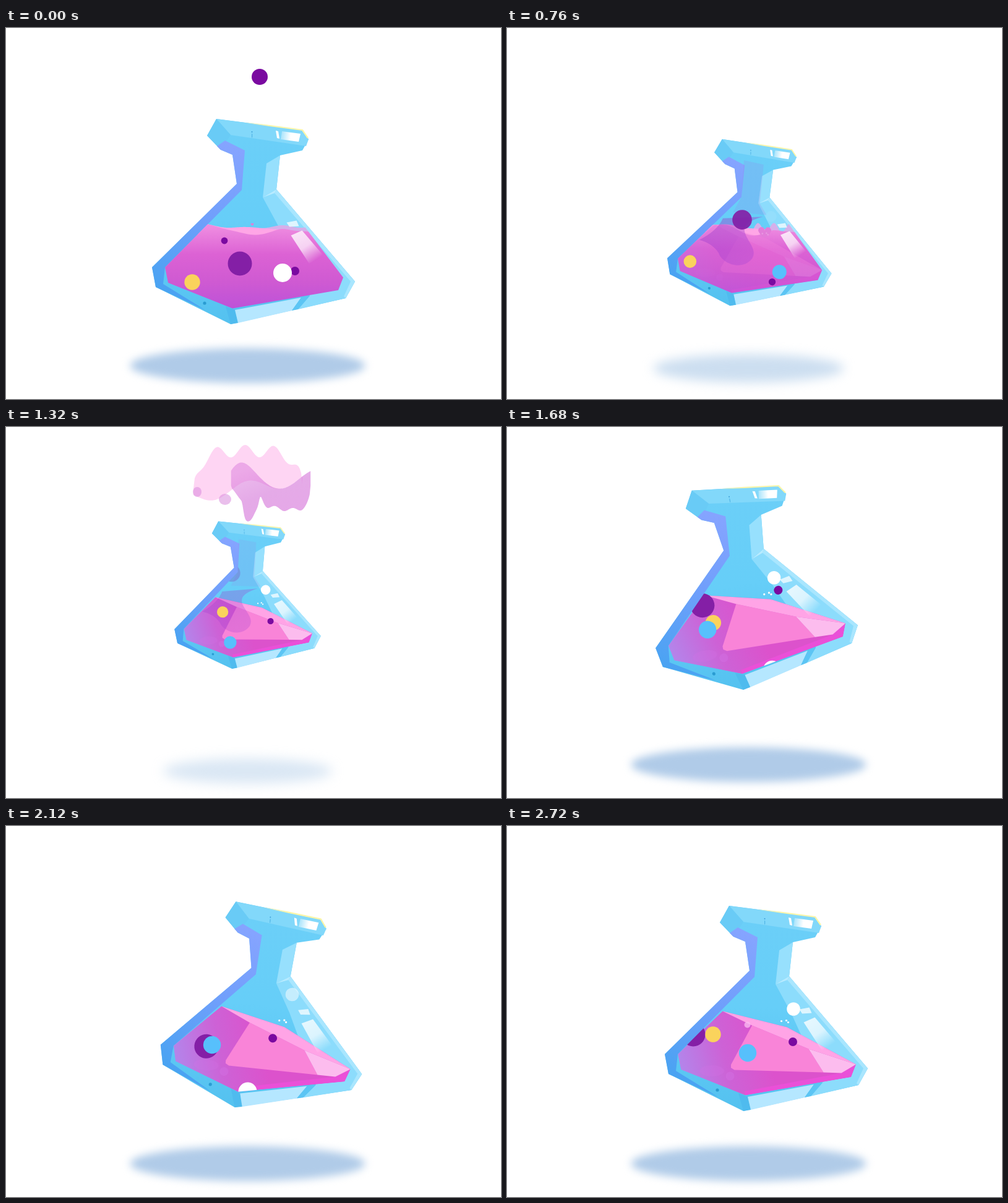
Recreate the animation shown at these times as an HTML page with a canvas. Size 800 by 600 pixels, loop 2760 ms.

```html
<!DOCTYPE html>
<html lang="en">
<head>
<meta charset="utf-8">
<title>Potion flask</title>
<style>
  html, body { margin: 0; width: 100%; height: 100%; overflow: hidden; background: #fff; }
  canvas { display: block; width: 800px; height: 600px; }
</style>
</head>
<body>
<canvas id="stage" width="800" height="600"></canvas>
<script>
const ctx = document.getElementById('stage').getContext('2d');
const LOOP = 2760, STEP = 40;

const clamp = v => Math.max(0, Math.min(1, v));
const ramp = (t, a, b) => { const k = clamp((t - a) / (b - a)); return k * k * (3 - 2 * k); };
const bump = (x, center, width) => Math.exp(-(((x - center) / width) ** 2));

// Monotone cubic motion through key poses [time, ...values].
function along(t, keys) {
  const last = keys.length - 1;
  t = Math.max(keys[0][0], Math.min(keys[last][0], t));
  let i = 0;
  while (i < last - 1 && t >= keys[i + 1][0]) i++;
  const h = keys[i + 1][0] - keys[i][0], u = (t - keys[i][0]) / h, w = 1 - u;
  return keys[0].slice(1).map((_, c) => {
    const value = j => keys[j][c + 1];
    const slope = j => (value(j + 1) - value(j)) / (keys[j + 1][0] - keys[j][0]);
    const tangent = j => {
      if (j === 0 || j === last) return 0;
      const a = slope(j - 1), b = slope(j);
      return a * b > 0 ? 2 * a * b / (a + b) : 0;
    };
    return value(i) * (1 + 2 * u) * w * w + tangent(i) * h * u * w * w
      + value(i + 1) * u * u * (3 - 2 * u) - tangent(i + 1) * h * u * u * w;
  });
}

function gradient(x0, y0, x1, y1, ...colors) {
  const g = ctx.createLinearGradient(x0, y0, x1, y1);
  colors.forEach((c, i) => g.addColorStop(i / (colors.length - 1), c));
  return g;
}

function trace(...points) {
  const p = points.flat();
  ctx.beginPath();
  for (let i = 0; i < p.length; i += 2) ctx.lineTo(p[i], p[i + 1]);
  ctx.closePath();
}

function poly(fill, ...points) {
  trace(...points);
  ctx.fillStyle = fill;
  ctx.fill();
}

// Area between two curves.
function band(fill, x0, x1, top, bottom) {
  const n = 90, xs = Array.from({ length: n + 1 }, (_, i) => x0 + (x1 - x0) * i / n);
  poly(fill, xs.map(x => [x, top(x)]).flat(), xs.reverse().map(x => [x, bottom(x)]).flat());
}

function dot(fill, x, y, r, ry = r) {
  ctx.beginPath();
  ctx.ellipse(x, y, r, ry, 0, 0, 7);
  ctx.fillStyle = fill;
  ctx.fill();
}

function layer(alpha, draw) {
  if (alpha <= 0) return;
  ctx.save();
  ctx.globalAlpha *= alpha;
  draw();
  ctx.restore();
}

// Corners shared by the facets of the glass and the crystal.
const lipBack = [340, 147], lipFront = [363, 173], lipLow = [347, 197], lipLeft = [325, 174];
const lipTail = [480, 165], lipRight = [489, 180], neckLeft = [366, 205], neckRight = [443, 206];
const waistLeft = [373, 252], waistRight = [437, 261], waistMid = [415, 274];
const left = [236, 387], leftLow = [242, 419], right = [564, 410], rightLow = [549, 437], bottom = [363, 479];
const inLeft = [257, 387], inLeftLow = [262, 412], inBottom = [366, 453.5];
const inRight = [545, 403.5], inRightLow = [537, 424], inWaist = [381, 262];
const peak = [329.5, 317.5], ridge = [433.5, 343.5], fold = [377, 340.5], elbow = [468.5, 378.5];
const heel = [492.5, 416.5], keel = [521.5, 417.5];

const FLASK_PATH = [
  [0, 400, 398.5, 0], [480, 400, 398.5, -4.8], [1040, 383.5, 359.5, 7.4], [1320, 390.5, 332.5, -1.3],
  [1680, 403.5, 339, -10.5], [2120, 412.5, 377.5, 4.3], [2720, 419, 380.5, 0],
];

const BUBBLES = [
  { color: '#7a0aa0', r: 7, path: [[0, 467, 393], [480, 444, 441], [1320, 452, 374], [1680, 448, 331], [2120, 416, 363], [2720, 443, 367]] },
  { color: '#841fa6', r: 19.5, path: [[0, 378, 381], [480, 386, 337], [1320, 367, 264], [1680, 323, 333], [2120, 310, 384], [2720, 282, 355]],
    alpha: t => 1 - 0.75 * (ramp(t, 700, 1000) - ramp(t, 1350, 1600)) },
  { color: '#fad35c', r: 12.7, path: [[0, 301, 411], [480, 275, 385], [1040, 297, 400], [1320, 345, 351], [2120, 319, 381], [2720, 314, 355]] },
  { color: '#57c0fc', r: 14.2, path: [[0, 447, 396], [480, 490, 397], [1180, 380, 431], [1680, 324, 373], [2120, 319, 381], [2720, 370, 385]] },
  { color: '#fff', r: 15, path: [[0, 447, 396], [480, 387, 439], [1040, 400, 482], [1680, 415, 456], [2120, 382, 452], [2720, 360, 482]] },
  { color: '#fff', r: 10.8, path: [[1040, 441, 299], [1680, 445, 310], [2120, 442, 290], [2720, 444, 314]],
    alpha: t => ramp(t, 700, 1080) * (1 - 0.5 * bump(t, 2120, 200)) },
];

function drawGlass() {
  poly(gradient(400, 150, 400, 470, '#6ccff8', '#66cef8', '#55c2f0'), lipBack, lipTail, lipRight, [479, 198],
    neckRight, waistRight, right, rightLow, bottom, leftLow, left, waistLeft, neckLeft, lipLow, lipLeft);
  // Lip
  poly('#82d8fa', lipBack, lipTail, lipRight, [485, 191], lipFront);
  poly('#69cbf6', lipBack, lipFront, lipLow, lipLeft);
  ctx.beginPath();
  ctx.moveTo(385, 152.5);
  ctx.lineTo(479, 165);
  ctx.lineTo(488, 178);
  ctx.strokeStyle = gradient(385, 0, 425, 0, '#fff6a800', '#fff6a8');
  ctx.lineWidth = 2.2;
  ctx.stroke();
  // Left edge
  poly(gradient(375, 190, 250, 420, '#86a4ff', '#6f9ffb', '#4aa3f2'), [341, 191, 354, 182, 386, 198],
    inWaist, inLeft, [254, 414, 322, 456], leftLow, left, waistLeft, neckLeft, lipLow);
  // Right facets
  poly('#97e0fd', [421, 219], neckRight, waistRight, waistMid);
  poly('#8cdcfc', waistMid, waistRight, right, rightLow, [472, 455, 491, 433, 440, 320]);
  poly('#a9e6fe', waistRight, right, rightLow, [546, 434, 557, 410, 434, 267]);
  poly('#b8ebff', waistMid, waistRight, [434, 267]);
  // Base
  poly('#4fbbee', [355, 450, 370, 456, 375, 477], bottom);
  poly('#b5e7ff', [370, 456, 477, 436, 462, 457, 375, 477]);
  poly('#5cc5f4', [477, 436, 491, 433, 472, 455, 462, 457]);
  dot('#2a9cd2', 321, 445, 2.6);
  dot('#3c9fd8', 397.5, 168, 1);
  dot('#4fb4e6', 397.6, 174, 0.6, 3.5);
}

function drawHighlights() {
  poly('#fff', [436, 166, 440, 167, 442, 179, 438, 178]);
  poly(gradient(445, 175, 475, 178, '#ffffff55', '#fff', '#fff'), [446, 167, 476, 171, 473, 184, 444, 180]);
  poly('#ffffffb8', [453.5, 314.5, 469.5, 311.5, 473.5, 320.5, 458, 321.5]);
  poly(gradient(468, 331, 500, 376, '#ffffffc8', '#ffffffb0', '#ffffff00'), [460.5, 335.5, 478.5, 327.5, 513, 368, 490, 381]);
}

function drawWave(t) {
  const swell = ramp(t, 0, 480), phase = t / 480;
  const level = x => 318 + (x - 328) * 0.07 + 3 * Math.sin((x - 330) / 17 - phase * 2) * bump(x, 350, 40);
  const crest = x => level(x) + (12 + 2 * swell) * bump(x, 398 + 6 * swell, 34) - 3 * bump(x, 445, 14);
  const back = x => 321 - (2 + 7 * swell) * Math.cos((x - 447) / 5.1 * (0.55 + 0.45 * swell)) + 12 * bump(x, 385, 18);
  band('#d5b0ea', 395, 500, back, () => 345);
  band('#ffa6e6', 310, 440, level, () => 365);
  band(gradient(0, 322, 0, 454, '#ee8be0', '#dc62d4', '#cf5ad2', '#bd52d8'), 250, 560, crest, () => 460);

  // Heart-shaped splash
  const size = 2.5 + 10.5 * swell, x = 398 + 31 * swell, y = 317 + 11 * swell;
  const lobes = v => y - size * 0.8 * Math.sqrt(Math.abs((v - x) / size) * (1 - Math.abs((v - x) / size)) * 2);
  band('#e27dd9', x - size, x + size, lobes, v => y + size * (1 - ((v - x) / size) ** 2));
  dot('#7a0aa0', 353 - 8 * phase, 344 - 12 * phase, 5.4 * (1 - ramp(t, 160, 400)));
}

function drawCrystal(t) {
  poly(gradient(262, 405, 400, 370, '#b484ea', '#cd62d6', '#dc52cc'), peak, ridge, inRight, inRightLow, inBottom, inLeftLow, inLeft);
  poly('#ea50d8', inBottom, inRightLow, inRight, keel, [365, 447]);
  poly('#f984d8', fold, elbow, heel, [348.5, 412.5, 343, 409, 343, 404]);
  poly('#ffa4e6', peak, ridge, inRight, elbow, fold);
  poly('#fcbcee', elbow, inRight, keel, heel);
  dot('#d272e460', 341.5, 422.5, 7);
  dot('#d272e440', 312, 414, 20, 9);
  layer(ramp(t, 2300, 2650), () => dot('#fbbcf2c0', 369.5, 339.5, 5));
  for (const [x, y] of [[424.5, 333.5], [432.5, 332.5], [435.5, 335.5]]) dot('#fff', x, y, 1.6);
}

const cloudFade = t => 1 - clamp((t - 1040) / 460) ** 1.6;

// Purple rush of liquid through the neck.
function drawRush(t) {
  layer(ramp(t, 680, 860) * cloudFade(t) ** 2, () => {
    poly('#9a7ae278', [384, 188, 424, 195, 418, 274, 432, 296, 365, 292], inWaist);
    ctx.beginPath();
    ctx.moveTo(299, 349);
    ctx.quadraticCurveTo(335, 330, 345, 305);
    ctx.lineTo(425, 300);
    ctx.bezierCurveTo(345, 322, 425, 355, 405, 384);
    ctx.bezierCurveTo(385, 410, 345, 395, 338, 374);
    ctx.quadraticCurveTo(325, 355, 299, 349);
    ctx.fillStyle = gradient(340, 310, 390, 400, '#9a3ccb', '#a43fd0', '#b04ad4');
    ctx.fill();
  });
}

// A mushroom of foam that ripples and thins out as it rises.
function drawCloud(t) {
  if (t < 760 || t > 1500) return;
  const age = Math.max(0, (t - 1040) / 280);
  const grow = Math.sin(clamp((t - 740) / 300) * Math.PI / 2), fade = cloudFade(t);
  const size = 88, start = -0.81 + 0.5 * age, end = 1.15;
  const inPixels = f => x => f(x / size);
  const brim = u => 3 - 11 * Math.cos(5 * u) - 15 * age * u;
  const dome = u => -(46 + 18 * age) * Math.sqrt(Math.max(0, 1 - u ** 4)) + 8 * u * (1 - age)
    + age * (8 - 10 * Math.cos(12 * (u + 0.05)));
  const fringe = u => brim(u) - 35 * age * bump(u, -0.2, 0.35);
  const trunk = u => (34 - 9 * age) * Math.exp(-(((u + 0.07 - 0.13 * age) / (0.2 - 0.05 * age)) ** 8));
  const drips = u => {
    const taper = Math.sqrt(Math.max(0, 1 - ((2 * u - start - end) / (end - start)) ** 6));
    const arches = 22 * bump(Math.abs(u + 0.05), 0.25, 0.1);
    return (38 + 14 * u + 4 * Math.cos(19 * u) - arches) * (1 - 0.2 * age) * taper + trunk(u);
  };
  ctx.save();
  ctx.translate(415, 205);
  ctx.scale(grow, grow);
  ctx.translate(6 - 30 * age, -80 - 30 * age);
  layer(fade, () => band('#fdb3ea', -size, size, inPixels(dome), inPixels(brim)));
  layer(fade, () => {
    band(gradient(-20, -20, 15, 70, '#dd84de', '#cf64d4', '#d060d4'), start * size, end * size, inPixels(fringe), inPixels(drips));
    layer(clamp(age), () => {
      dot('#d98add', -37, 22, 10, 9);
      dot('#d98add', -82, 10, 7, 8);
    });
  });
  layer(1 - clamp(age * 1.4), () => dot('#7a0aa0', 21, 24, 7));
  ctx.restore();
}

function drawDrop(t) {
  if (t > 600) return;
  const k = t / 480, cut = ramp(t, 240, 480);
  const x = 410 - 33.5 * k, y = 79 + 23 * k, edge = x - 14 + 5 * cut;
  ctx.save();
  trace([edge, y - 15, x + 20, y - 15, x + 20, y + 15, edge + 5 * cut, y + 15]);
  ctx.clip();
  dot('#7a0aa0', x, y, (13 - 1.6 * k) * (1 - ramp(t, 480, 620)));
  ctx.restore();
}

function drawShadow(t, scale) {
  layer(1 - (1 - scale) * 1.9, () => {
    ctx.filter = `blur(${7 + (1 - scale) * 10}px)`;
    dot('#b0cbe8', 390.5, 546 + 31 * bump(t, 1080, 230), 190 * scale, 28 * scale);
  });
}

function drawFlask(t, scale) {
  const [x, y, tilt] = along(t, FLASK_PATH);
  ctx.save();
  ctx.translate(x, y);
  ctx.rotate(tilt * Math.PI / 180);
  ctx.scale(scale, scale);
  ctx.translate(-400, -398.5);
  drawGlass();
  ctx.save();
  trace([384, 188, 443, 200], waistRight, inRight, inRightLow, inBottom, inLeftLow, inLeft, inWaist);
  ctx.clip();
  const settled = ramp(t, 700, 900);
  if (settled < 1) drawWave(t);
  layer(settled, () => drawCrystal(t));
  drawRush(t);
  for (const { color, r, path, alpha } of BUBBLES)
    layer(alpha ? alpha(t) : 1, () => dot(color, ...along(t, path), r));
  ctx.restore();
  drawHighlights();
  ctx.restore();
}

function render(now) {
  const t = Math.floor(now % LOOP / STEP) * STEP;
  const scale = 1 - 0.3 * ramp(t, 560, 900) + 0.3 * ramp(t, 1260, 1640);
  ctx.fillStyle = '#fff';
  ctx.fillRect(0, 0, 800, 600);
  drawShadow(t, scale);
  drawCloud(t);
  drawFlask(t, scale);
  drawDrop(t);
  requestAnimationFrame(render);
}
requestAnimationFrame(render);
</script>
</body>
</html>
```
